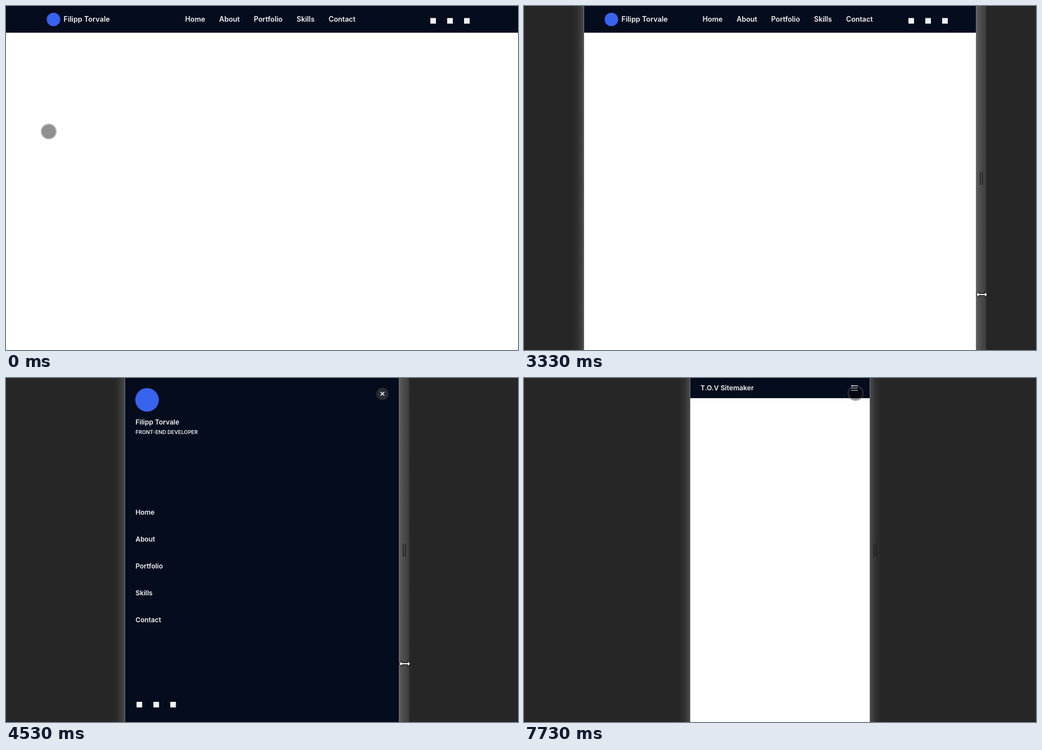
Write an HTML page with a canvas that moves like this. It is 911 px wide and 614 px high and loops after 8 s.

```html
<!DOCTYPE html>
<html lang="en">
<head>
<meta charset="utf-8">
<title>Responsive navigation</title>
<style>
  html, body { margin: 0; width: 100%; height: 100%; overflow: hidden; background: #262626; }
  canvas { display: block; }
</style>
</head>
<body>
<canvas id="stage" width="911" height="614"></canvas>
<script>
const ctx = document.getElementById('stage').getContext('2d');
const W = 911, H = 614, LOOP = 8000, STEP = 200 / 3;
const NAVY = '5,12,29', BAR = `rgb(${NAVY})`;
const BLUE = '#3763ee', LIGHT = '#f4f4f6', EDGE = '#75757a';
const OWNER = 'Filipp Torvale', SITE = 'T.O.V Sitemaker';
const LINKS = ['Home', 'About', 'Portfolio', 'Skills', 'Contact'];
const MENU_IN = 3882, MENU_OUT = 6470;

const lerp = (a, b, p) => a + (b - a) * p;
const span = (t, from, to) => Math.min(1, Math.max(0, (t - from) / (to - from)));
const smooth = u => u * u * (3 - 2 * u);
// A drag that starts fast and slows down
const settle = u => u * (1 + 0.63 * (1 - u));

// Same curve as the CSS "ease" keyword
function ease(x) {
  if (x === 0 || x === 1) return x;
  let lo = 0, hi = 1;
  for (let i = 0; i < 20; i++) {
    const s = (lo + hi) / 2;
    if (0.75 * s * (1 - s) + s ** 3 < x) lo = s; else hi = s;
  }
  return 0.3 * lo * (1 - lo) ** 2 + 3 * lo * lo * (1 - lo) + lo ** 3;
}

function pageLeft(t) {
  return Math.round(212 * settle(span(t, 2660, 4533)) + 84 * settle(span(t, 4600, 5333)));
}

function rect(x, y, w, h, color) {
  ctx.fillStyle = color;
  ctx.fillRect(x, y, w, h);
}

function disc(x, y, r, color) {
  ctx.fillStyle = color;
  ctx.beginPath();
  ctx.arc(x, y, r, 0, Math.PI * 2);
  ctx.fill();
}

function setFont(size, weight = 600) {
  ctx.font = `${weight} ${size}px Inter, "Open Sans", sans-serif`;
}

function label(str, x, y, size, color, weight) {
  setFont(size, weight);
  ctx.fillStyle = color;
  ctx.fillText(str, x, y + size * 0.36);
}

function socials(x, y, color) {
  for (let i = 0; i < 3; i++) rect(x + i * 30 - 5, y - 5, 10, 10, color);
}

function glow(x, dir) {
  const g = ctx.createLinearGradient(x, 0, x + dir * 24, 0);
  for (let i = 0; i <= 4; i++) {
    g.addColorStop(i / 4, `rgba(255,255,255,${0.18 * (1 - i / 4) ** 2})`);
  }
  rect(Math.min(x, x + dir * 24), 0, 24, H, g);
}

function surround(l, r, hover) {
  rect(0, 0, W, H, '#262626');
  if (!l) return;
  glow(l, -1);
  glow(r, 1);
  rect(r, 0, 18, H, `rgba(255,255,255,${0.11 * hover})`);
  for (const x of [r + 7, r + 11]) rect(x, 296, 1.3, 23, '#181818');
  for (const x of [l - 1, r]) rect(x, 0, 1, H, EDGE);
}

function desktopLinks(center) {
  const size = 12.5, gap = 25;
  setFont(size);
  const widths = LINKS.map(name => ctx.measureText(name).width);
  let x = center - (widths.reduce((a, b) => a + b) + gap * (LINKS.length - 1)) / 2;
  LINKS.forEach((name, i) => {
    label(name, x, 23, size, LIGHT);
    x += widths[i] + gap;
  });
}

function desktopBar(l, r) {
  const x = Math.max(72.5, l + 36.5);
  rect(l, 0, r - l, 47, BAR);
  rect(l, 47, r - l, 1, '#5b5e69');
  disc(x + 12, 24, 12, BLUE);
  label(OWNER, x + 30, 23, 12.7, LIGHT);
  desktopLinks(470.3 - l / 100);
  socials(W - x - 78.5, 26.5, LIGHT);
}

function mobileBar(l, r) {
  rect(l, 0, r - l, 36, BAR);
  label(SITE, l + 18, 18, 12.2, LIGHT);
  for (let i = 0; i < 3; i++) rect(r - 33, 13 + i * 4, 12, 1.7, LIGHT);
}

function closeButton(x, y, p) {
  disc(x, y, 11, '#292b33');
  const c = lerp(75, 244, p);
  ctx.strokeStyle = `rgb(${c},${c},${c})`;
  ctx.lineWidth = 1.6;
  ctx.beginPath();
  for (const d of [-3.3, 3.3]) {
    ctx.moveTo(x - 3.3, y - d);
    ctx.lineTo(x + 3.3, y + d);
  }
  ctx.stroke();
}

function menu(l, r, p) {
  const x = l + 18.5, tone = lerp(227, 244, p), dark = lerp(26, 240, p);
  const color = `rgb(${tone},${tone + 1},${tone + 3})`;
  rect(l, 0, r - l, H, `rgba(${NAVY},${p})`);
  disc(l + 39, lerp(20.5, 39, p), 21, BLUE);
  label(OWNER, x, lerp(60.7, 79, p), lerp(12.7, 12, p), color);
  label('FRONT-END DEVELOPER', x, lerp(81, 97, p), 9.2,
    `rgb(${dark},${dark},${dark})`, p > 0.5 ? 600 : 400);
  LINKS.forEach((name, i) => {
    const y = lerp(337.6, 336, p) + (i - 2) * lerp(49.6, 48, p);
    label(name, x, y, lerp(12.5, 11.9, p), color);
  });
  socials(l + 25.3, lerp(601, 583, p), color);
  closeButton(r - 29.2, lerp(10.7, 28.2, p), p);
}

function touch(x, y) {
  disc(x, y, 12, 'rgba(0,0,0,0.44)');
  ctx.strokeStyle = 'rgba(90,90,90,0.45)';
  ctx.lineWidth = 2.4;
  ctx.beginPath();
  ctx.arc(x, y, 12.9, 0, Math.PI * 2);
  ctx.stroke();
}

function resizeArrow(x, y) {
  const half = [[-9.5, 0], [-5.5, -4], [-5.5, -1], [5.5, -1], [5.5, -4]];
  ctx.beginPath();
  half.forEach(([a, b]) => ctx.lineTo(x + a, y + b));
  half.forEach(([a, b]) => ctx.lineTo(x - a, y - b));
  ctx.closePath();
  ctx.strokeStyle = '#000';
  ctx.lineWidth = 1.6;
  ctx.stroke();
  ctx.fillStyle = '#fff';
  ctx.fill();
}

function pointer(t, r) {
  if (t < 300) {
    const u = span(t, 0, 267);
    touch(lerp(76, 121, u), lerp(224, 594, smooth(u)));
  } else if (t > 1660 && t < 1860) {
    const u = span(t, 1667, 1800);
    touch(lerp(839, 900, u), lerp(600, 543, u));
  } else if (t > 2660 && t < 5460) {
    resizeArrow(r + 10.5, lerp(520, 510, settle(span(t, 2660, 4533))));
  } else if (t > 5460) {
    // Up to the close button, away from it, back to the menu icon
    const up = smooth(span(t, 5400, 6267));
    const away = smooth(span(t, 6467, 7133));
    const back = smooth(span(t, 7200, 7733));
    const x = 626 - 38 * up * up - 22 * away + 24 * back;
    const y = 510 - 481 * up + 63 * away - 65 * back;
    (x >= r ? resizeArrow : touch)(x, y);
  }
}

function draw(now) {
  const t = Math.floor((now % LOOP + 3.5) / STEP) * STEP;
  const l = pageLeft(t), r = W - l;
  surround(l, r, 1 - span(t, 5800, 6000));

  ctx.save();
  ctx.beginPath();
  ctx.rect(l, 0, r - l, H);
  ctx.clip();
  rect(l, 0, r - l, H, '#fff');
  if (t < MENU_IN) desktopBar(l, r);
  else {
    mobileBar(l, r);
    const out = ease(span(t, MENU_OUT, MENU_OUT + 400));
    ctx.translate(-out * (r - l), 0);
    if (out < 1) menu(l, r, ease(span(t, MENU_IN, MENU_IN + 600)));
  }
  ctx.restore();
  pointer(t, r);
}

const start = performance.now();
function tick() {
  draw(performance.now() - start);
  requestAnimationFrame(tick);
}
tick();
</script>
</body>
</html>
```
